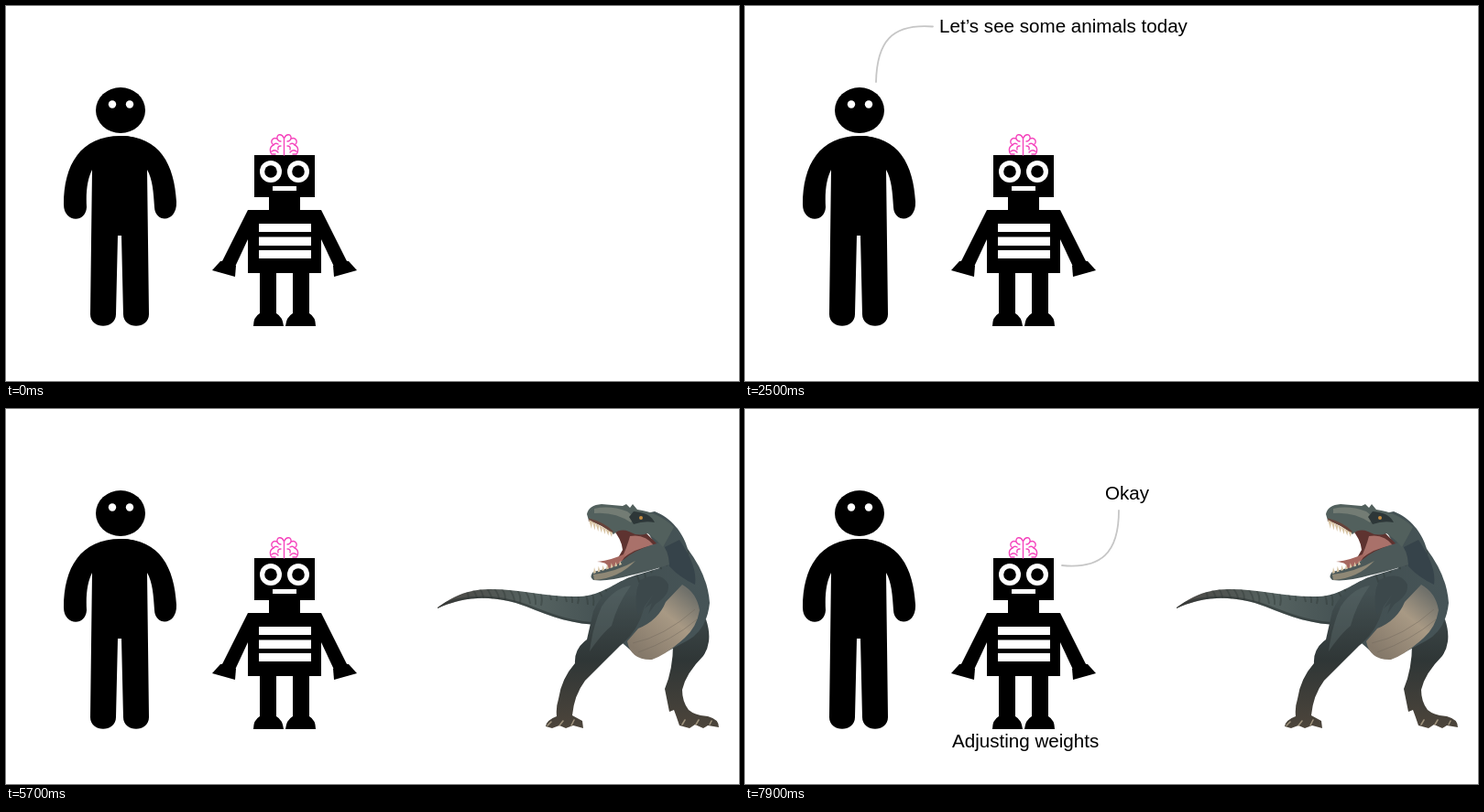
An HTML page for the animation above (8000 ms loop, 800 px wide and 410 px high).

```html
<!DOCTYPE html>
<html lang="en">
<head>
<meta charset="utf-8">
<title>Teaching a robot</title>
<style>
html, body { margin: 0; width: 100%; height: 100%; overflow: hidden; background: #fff; }
svg { display: block; width: 100%; height: 100%; }
text { font: 20.6px "Liberation Sans", Arial, sans-serif; }
.line { fill: none; stroke: #c6c6c6; stroke-width: 1.8; stroke-linecap: round; }
.brain { fill: none; stroke: #f545bd; stroke-width: 1.4; stroke-linecap: round; stroke-linejoin: round; }
[data-on] { visibility: hidden; }
</style>
</head>
<body>
<svg viewBox="0 0 800 410">
  <defs>
    <linearGradient id="hide" x1="471" y1="0" x2="768" y2="0" gradientUnits="userSpaceOnUse">
      <stop offset="0" stop-color="#4a4642"/>
      <stop offset=".35" stop-color="#566361"/>
      <stop offset=".65" stop-color="#424f51"/>
      <stop offset="1" stop-color="#465457"/>
    </linearGradient>
    <linearGradient id="leg" x1="0" y1="200" x2="0" y2="350" gradientUnits="userSpaceOnUse">
      <stop offset="0" stop-color="#435052"/>
      <stop offset=".5" stop-color="#2f3636"/>
      <stop offset="1" stop-color="#4d453b"/>
    </linearGradient>
    <linearGradient id="belly" x1="690" y1="265" x2="745" y2="200" gradientUnits="userSpaceOnUse">
      <stop offset="0" stop-color="#85796a"/>
      <stop offset=".6" stop-color="#a89984"/>
      <stop offset="1" stop-color="#6f706a"/>
    </linearGradient>
    <clipPath id="bodyClip"><use href="#body"/></clipPath>
    <g id="limb">
      <path d="M264 223V255L250 285L236 279Z"/>
      <path d="M225 289L234 279Q243 278 251 284L250 296Z"/>
      <path d="M277 291H295V336Q302 340 303 350H270Q270 340 277 336Z"/>
    </g>
    <path id="lobe" d="M303 144C301 139 295 140 296 145C290 143 288 149 292 152C287 154 288 160 290 162H294M296 145Q297 148 300 148M292 152Q294 149 297 151M300 153Q296 153 297 157M290 159Q294 156 297 160"/>
  </defs>

  <!-- person -->
  <ellipse cx="125" cy="114" rx="27" ry="25"/>
  <circle cx="116" cy="107.5" r="4.2" fill="#fff"/>
  <circle cx="135" cy="107.5" r="4.2" fill="#fff"/>
  <path d="M125 142C81 142 63 174 63 217C63 237 87 238 88 220C87 202 89 189 94 179L92 337C92 354 120 354 120 337L122 251H126L128 337C128 354 156 354 156 337L154 179V150Q142 142 125 142Z"/>
  <path data-on="0-5900 7900-8000" d="M125 142C168 142 184 174 186 214C187 237 163 238 162 220C161 204 160 189 154 179L140 160Z"/>
  <path data-on="5900-7900" d="M125 142C153 142 173 146 187 157L206 174C218 186 206 203 192 196C179 184 168 175 154 171L140 160Z"/>

  <!-- robot -->
  <path d="M271 163H337V209H321V223H344V292H264V223H287V209H271Z"/>
  <use href="#limb"/>
  <use href="#limb" transform="matrix(-1 0 0 1 608 0)"/>
  <g fill="#fff">
    <circle cx="289" cy="181" r="12"/>
    <circle cx="319" cy="181" r="12"/>
    <path d="M291 197H317V202H291ZM276 238H333V247H276ZM276 252.500H333V262H276ZM276 267H333V276H276Z"/>
  </g>
  <circle cx="289" cy="181" r="6.800"/>
  <circle cx="319" cy="181" r="6.800"/>
  <g class="brain">
    <use href="#lobe"/>
    <use href="#lobe" transform="matrix(-1 0 0 1 607 0)"/>
    <path d="M303.500 144V163"/>
  </g>

  <!-- dinosaur -->
  <g data-on="4700-8000">
    <path fill="url(#leg)" d="M730 235L764 230Q772 254 761 270Q742 289 738 307Q738 320 745 329Q752 335 766 336Q778 339 778 348L766 346L761 349L752 345L746 349L735 346Q732 337 729 329L724 331L719 306Q729 282 728 250Z"/>
    <path id="body" fill="url(#hide)" d="M471 217C487 205 504 197 528 197C563 197 590 206 625 205C653 204 666 187 690 181L713 174L707 146L690 116L708 112C726 119 739 135 744 153Q766 182 768 212Q765 241 744 253L720 266Q695 278 682 264L650 236C620 236 595 227 568 216C538 205 506 202 471 218Z"/>
    <g clip-path="url(#bodyClip)" fill="none">
      <path stroke="#262e2e" stroke-opacity=".5" stroke-width="9" d="M471 219C506 204 538 207 568 218C595 229 620 238 650 238"/>
      <g id="bands" stroke="#283130" stroke-opacity=".35" stroke-width="2"></g>
    </g>
    <path fill="url(#belly)" d="M738 192Q754 201 757 220Q754 238 741 250Q720 269 705 274Q682 275 678 254L690 240Q712 231 720 211Z"/>
    <path fill="none" stroke="#6f675b" stroke-opacity=".45" d="M684 256Q718 249 752 219M690 266Q727 253 754 230"/>
    <path fill="#36434a" d="M735 143Q755 172 752 192Q735 184 724 172L719 151Z"/>
    <path fill="url(#leg)" d="M641 221Q654 192 682 185Q704 194 696 219Q689 244 670 259Q649 280 632 297Q620 313 618 335L629 341L630 349L619 346L611 349L604 346L596 349L589 347Q590 340 601 336Q600 326 603 317Q606 295 621 278Q620 262 634 252Z"/>
    <path fill="#5f6f6e" fill-opacity=".4" d="M650 216Q663 196 682 193Q667 214 661 237Q650 246 637 265Q640 239 650 216Z"/>
    <path fill="#3c484b" d="M692 187Q715 176 723 192Q724 204 709 213L701 224L705 212L697 218L707 202L690 225Q684 206 692 187Z"/>
    <path fill="#5e3330" d="M661 130L691 128L712 149L691 161L665 168L673 154Q672 142 661 130Z"/>
    <path fill="#a9716a" d="M681 139Q697 136 707 149Q686 152 671 165Q678 151 681 139Z"/>
    <path fill="#4c5959" d="M714 146Q723 153 724 170Q700 178 681 182Q657 189 641 187Q636 183 641 178Q665 174 680 160Q694 151 714 146Z"/>
    <path fill="#8f8876" d="M641 181Q666 178 687 166Q669 185 642 187Z"/>
    <path fill="#a5675f" d="M645 167Q662 165 676 158Q674 170 655 175Q660 168 645 167Z"/>
    <path fill="#52605d" d="M634 115Q636 105 650 104L673 106L677 104L681 108L684 104L689 110Q712 113 729 129L717 151Q707 140 700 136Q690 140 680 134Q670 130 663 137Q652 126 636 122Z"/>
    <path fill="#737c74" d="M642 109Q659 105 678 112Q688 119 682 124Q664 112 642 114Z"/>
    <path fill="#2d3738" d="M685 112Q703 113 708 124Q696 122 685 126L680 118Z"/>
    <circle cx="693" cy="119" r="2" fill="#c58c42"/>
    <path fill="none" stroke="#66433a" stroke-width="3" d="M636 121Q652 125 662 135"/>
    <g id="teeth" fill="#d9c6a6"></g>
    <path fill="none" stroke="#a0947e" stroke-width="1.500" stroke-linecap="round" d="M591 346L595 342M604 346L608 341M617 346L620 340M738 345L741 340M753 345L756 340M768 345L770 341"/>
  </g>

  <!-- speech -->
  <g data-on="500-2700 5900-7900"><path class="line" d="M143 83C144 40 159 19 205 22.500"/></g>
  <g data-on="2700-4700 7900-8000"><path class="line" d="M346 171C388 175 408 158 408 111"/></g>
  <text x="212" y="29" data-on="500-2700">Let’s see some animals today</text>
  <text x="361" y="98" data-on="2700-4700">Yay! Sounds fun</text>
  <text x="211" y="30" data-on="5900-7900">This is a dinosaur</text>
  <text x="393" y="99" data-on="7900-8000">Okay</text>
  <text x="226" y="370" data-on="7900-8000">Adjusting weights</text>
</svg>
<script>
const LOOP = 8000;
const find = id => document.getElementById(id);

// hide bands along the tail and back
let bands = "";
for (let x = 500; x < 765; x += 8) {
  const y = x < 650 ? 195 : 195 - (x - 650) * 0.6;
  bands += `<path d="M${x} ${y}q7 9 ${4 + x % 5} ${14 + x % 7}"/>`;
}
find("bands").innerHTML = bands;

// upper teeth point down, lower teeth point up
let teeth = "";
for (let i = 0; i < 7; i++) {
  const u = i / 6;
  teeth += `<path d="M${636 + 22 * u} ${121 + 12 * u}l4 2l-1 ${8 - 3 * u}z"/>`;
  teeth += `<path d="M${641 + 28 * u} ${180 - 9 * u}l3 -1l-2 ${-6 + u * 2}z"/>`;
}
find("teeth").innerHTML = teeth;

const parts = [...document.querySelectorAll("[data-on]")].map(el => ({
  el, spans: el.dataset.on.split(" ").map(s => s.split("-").map(Number))
}));

function draw(now) {
  const t = now % LOOP;
  for (const { el, spans } of parts) {
    const on = spans.some(([from, to]) => t >= from && t < to);
    el.style.visibility = on ? "visible" : "hidden";
  }
}

const start = performance.now();
function tick() {
  draw(performance.now() - start);
  requestAnimationFrame(tick);
}
tick();
</script>
</body>
</html>
```
